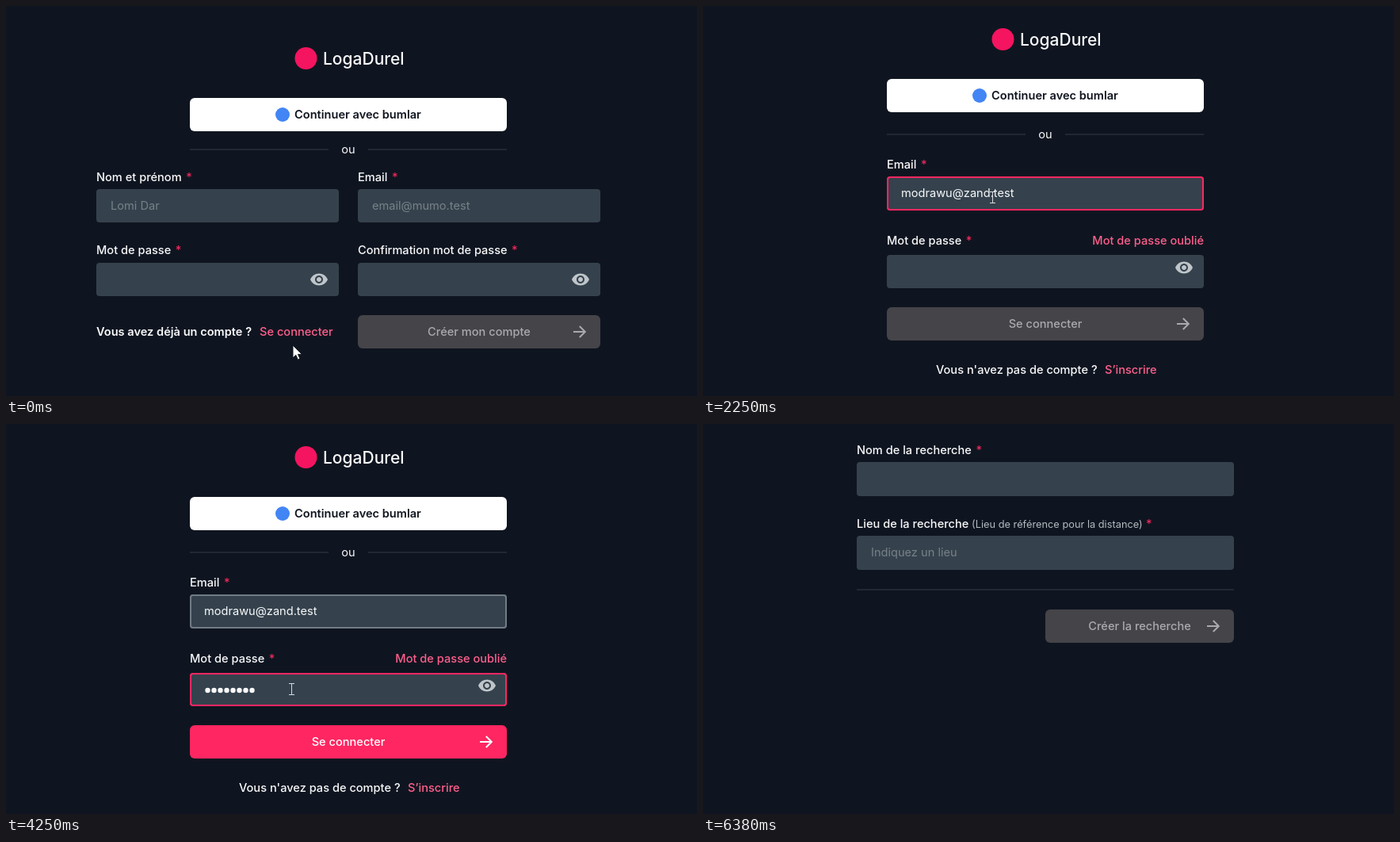
An HTML page with a canvas that plays this animation: 872x492 px, repeating every 6.51 s.

```html
<!DOCTYPE html>
<html lang="fr">
<head>
<meta charset="utf-8">
<title>Connexion</title>
<style>
  html, body { margin: 0; width: 100%; height: 100%; overflow: hidden; background: #0f1520; }
  canvas { display: block; width: 872px; height: 492px; }
</style>
</head>
<body>
<canvas id="stage" width="872" height="492"></canvas>
<script>
const ctx = document.getElementById('stage').getContext('2d');
const LOOP = 6510, STEP = 125, LAST = 51;
const C = {
  bg: '#0f1520', field: '#35424d', text: '#f8f9fa', hint: '#788088', pink: '#ff2661',
  link: '#ff5f8c', star: '#f0285c', error: '#ee304f', line: '#212834', off: '#454449',
  offText: '#aaaaad', icon: '#bfc5c9', hover: '#707b85', note: '#b4bac0'
};
const EMAIL = 'modrawu@zand.test';
const EMAIL_HINT = 'email@mumo.test';
const eye = new Path2D('M12 4.5C7 4.5 2.73 7.61 1 12c1.73 4.39 6 7.5 11 7.5s9.27-3.11 11-7.5c-1.73-4.39-6-7.5-11-7.5z' +
  'M12 17c-2.76 0-5-2.24-5-5s2.24-5 5-5 5 2.24 5 5-2.24 5-5 5z' +
  'm0-8c-1.66 0-3 1.34-3 3s1.34 3 3 3 3-1.34 3-3-1.34-3-3-3z');
const arrowShape = new Path2D('M0 0V16L3.8 12.4L6.4 18.2L9 17L6.5 11.4H11.4Z');
const handShape = new Path2D('M-1.5 0.5Q0 -1 1.5 0.5V6L9 8Q10.5 8.5 10 11L8.5 18H0L-5.5 11Q-5 8.5 -1.5 11Z');

// Pointer keys: step, x, y
const path = [
  [0, 362, 428], [5, 366, 416], [11, 366, 416], [14, 365, 242], [31, 365, 242],
  [34, 360, 335], [37, 373, 402], [41, 373, 402], [45, 380, 500]
];
const clicks = [[10, 366, 416], [15, 366, 243], [39, 373, 402]];

const clamp = (v, lo, hi) => Math.min(hi, Math.max(lo, v));

function pointerAt(k) {
  const i = path.findIndex(p => p[0] > k);
  if (i < 0) return null;
  const [k0, x0, y0] = path[i - 1], [k1, x1, y1] = path[i];
  const u = (k - k0) / (k1 - k0), e = u * u * (3 - 2 * u);
  return { x: x0 + (x1 - x0) * e, y: y0 + (y1 - y0) * e };
}

// y is the optical middle of the line; returns the text width
function text(str, x, y, { size = 14.6, weight = 400, color = C.text, align = 'left' } = {}) {
  ctx.font = `${weight} ${size}px Inter, sans-serif`;
  ctx.textAlign = align;
  ctx.fillStyle = color;
  ctx.fillText(str, x, y + size * 0.35);
  return ctx.measureText(str).width;
}

function box(x, y, w, h, color, r = 4) {
  ctx.fillStyle = color;
  ctx.beginPath();
  ctx.roundRect(x, y, w, h, r);
  ctx.fill();
}

function disc(x, y, r, color) {
  ctx.fillStyle = color;
  ctx.beginPath();
  ctx.arc(x, y, r, 0, Math.PI * 2);
  ctx.fill();
}

function rule(x0, x1, y) {
  ctx.fillStyle = C.line;
  ctx.fillRect(x0, y - 1, x1 - x0, 2);
}

function label(str, x, y) {
  const w = text(str, x, y, { weight: 500 });
  text('*', x + w + 5.5, y, { color: C.star, weight: 500 });
}

function field(x, y, w, h, { hint, border } = {}) {
  box(x, y, w, h, C.field);
  if (border) {
    ctx.strokeStyle = border;
    ctx.lineWidth = 2;
    ctx.beginPath();
    ctx.roundRect(x + 1, y + 1, w - 2, h - 2, 3);
    ctx.stroke();
  }
  if (hint) text(hint, x + 18, y + 21, { color: C.hint });
}

function eyeIcon(x, y) {
  ctx.save();
  ctx.translate(x - 12, y - 12);
  ctx.fillStyle = C.icon;
  ctx.fill(eye, 'evenodd');
  ctx.restore();
}

function button(str, x, y, w, active) {
  box(x, y, w, 42, active ? C.pink : C.off, 6);
  const color = active ? '#fff' : C.offText;
  text(str, x + w / 2, y + 21, { weight: 500, color, align: 'center' });
  const ax = x + w - 26.5, ay = y + 21;
  ctx.strokeStyle = color;
  ctx.lineWidth = 2;
  ctx.beginPath();
  ctx.moveTo(ax - 7.5, ay);
  ctx.lineTo(ax + 7, ay);
  ctx.moveTo(ax + 0.3, ay - 7);
  ctx.lineTo(ax + 7.3, ay);
  ctx.lineTo(ax + 0.3, ay + 7);
  ctx.stroke();
}

function header(y, ruleY) {
  disc(378.5, y, 14, '#f5145f');
  text('LogaDurel', 400, y + 1, { size: 21, weight: 500 });
  box(232, y + 50, 400, 42, '#fff', 6);
  disc(349, y + 71, 9, '#4285f4');
  text('Continuer avec bumlar', 364, y + 71, { weight: 600, color: '#10151f' });
  rule(232, 407, ruleY);
  rule(457, 632, ruleY);
  text('ou', 432, ruleY, { align: 'center' });
}

function signup() {
  header(66, 181);
  label('Nom et prénom', 114, 216);
  label('Email', 444, 216);
  field(114, 231, 306, 42, { hint: 'Lomi Dar' });
  field(444, 231, 306, 42, { hint: EMAIL_HINT });
  label('Mot de passe', 114, 308);
  label('Confirmation mot de passe', 444, 308);
  for (const x of [114, 444]) {
    field(x, 324, 306, 42);
    eyeIcon(x + 281, 345);
  }
  text('Vous avez déjà un compte ?', 114, 411, { weight: 600 });
  text('Se connecter', 320, 411, { weight: 500, color: C.link });
  button('Créer mon compte', 444, 390, 306, false);
}

function login(k) {
  const typed = EMAIL.slice(0, clamp((k - 15) * 6, 0, EMAIL.length));
  const dots = k < 22 ? 0 : Math.min(8, Math.floor((k - 22) * 0.6) + 1);
  const error = dots > 0 && dots < 5;
  const up = error ? -18 : 0, down = -up;
  const onEmail = k >= 15 && k < 21, onPass = k >= 21;
  const hovered = k === 14 || (k >= 28 && k <= 34);

  header(42 + up, 162 + up);
  label('Email', 232, 200 + up);
  field(232, 215 + up, 400, 43, {
    hint: typed ? '' : EMAIL_HINT,
    border: onEmail ? C.pink : hovered ? C.hover : null
  });
  text(typed, 250, 236 + up);

  label('Mot de passe', 232, 296 + up);
  text('Mot de passe oublié', 632, 296 + up, { weight: 500, color: C.link, align: 'right' });
  field(232, 314 + up, 400, 42, { border: onPass ? C.pink : null });
  eyeIcon(607, 330 + up);
  for (let i = 0; i < dots; i++) disc(254.5 + i * 8, 336 + up, 3.2, C.text);
  if (error) {
    ctx.fillStyle = C.text;
    ctx.fillRect(250 + dots * 8, 325 + up, 1, 20);
    const style = { size: 12.8, color: C.error };
    text('Le champ password doit contenir au minimum 5', 232, 351, style);
    text('caractères', 232, 367, style);
  }
  button('Se connecter', 232, 380 + down, 400, dots >= 5);
  text("Vous n'avez pas de compte ?", 294, 459 + down, { weight: 500 });
  text('S’inscrire', 507, 459 + down, { weight: 500, color: C.link });
}

function search() {
  label('Nom de la recherche', 194, 33);
  field(194, 48, 476, 43);
  text('Lieu de la recherche', 194, 126, { weight: 500 });
  text('(Lieu de référence pour la distance)', 339, 127, { size: 12.8, color: C.note });
  text('*', 559, 126, { color: C.star, weight: 500 });
  field(194, 141, 476, 43, { hint: 'Indiquez un lieu' });
  rule(194, 670, 209);
  button('Créer la recherche', 432, 234, 238, false);
}

function ring(k) {
  for (const [start, x, y] of clicks) {
    const age = k - start;
    if (age !== 0 && age !== 1) continue;
    disc(x, y, age ? 40 : 31.5, `rgba(235, 215, 50, ${age ? 0.3 : 0.57})`);
  }
}

function pointerKind(k) {
  if ((k >= 3 && k < 10) || (k >= 36 && k < 40)) return 'hand';
  if ((k >= 14 && k < 22) || (k >= 28 && k < 36)) return 'beam';
  return 'arrow';
}

function pointer(k) {
  const p = pointerAt(k);
  if (!p) return;
  const kind = pointerKind(k);
  ctx.save();
  ctx.translate(p.x, p.y);
  if (kind === 'beam') {
    ctx.strokeStyle = '#d5d9dc';
    ctx.lineWidth = 1;
    ctx.beginPath();
    ctx.moveTo(-3, -7.5);
    ctx.lineTo(4, -7.5);
    ctx.moveTo(0.5, -7.5);
    ctx.lineTo(0.5, 6.5);
    ctx.moveTo(-3, 6.5);
    ctx.lineTo(4, 6.5);
    ctx.stroke();
  } else {
    const shape = kind === 'hand' ? handShape : arrowShape;
    ctx.fillStyle = '#fff';
    ctx.strokeStyle = '#10131a';
    ctx.lineWidth = 1;
    ctx.fill(shape);
    ctx.stroke(shape);
  }
  ctx.restore();
}

function draw(now) {
  const k = Math.min(LAST, Math.floor((now % LOOP + 5) / STEP));
  ctx.fillStyle = C.bg;
  ctx.fillRect(0, 0, 872, 492);
  if (k < 10) signup();
  else if (k < 40) login(k);
  else search();
  ring(k);
  pointer(k);
}

const began = performance.now();
function tick() {
  draw(performance.now() - began);
  requestAnimationFrame(tick);
}
tick();
</script>
</body>
</html>
```
